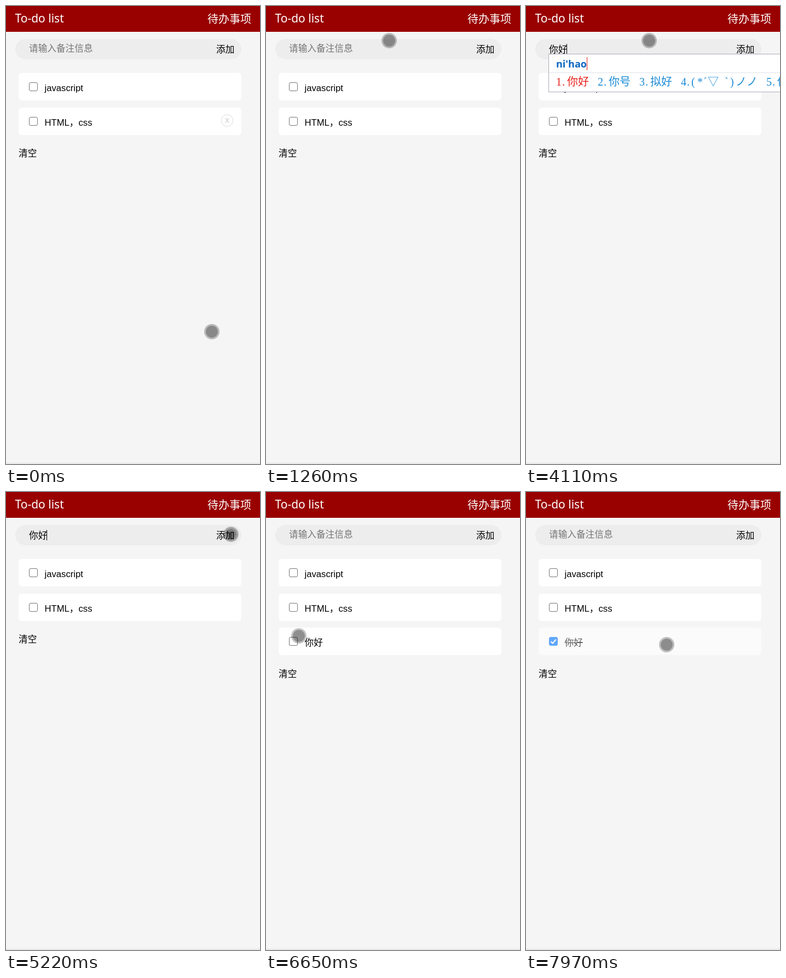
An HTML page for the animation above (8 s loop, 464 px wide and 834 px high).

```html
<!DOCTYPE html>
<html lang="zh-CN">
<head>
<meta charset="utf-8">
<style>
html, body { margin: 0; width: 100%; height: 100%; overflow: hidden; background: #f5f5f5; }
svg { display: block; width: 464px; height: 834px; }
text { font: 16.67px "Liberation Sans", "Noto Sans CJK SC", "Noto Sans CJK", sans-serif; white-space: pre; }
.head { font: 20px "Noto Sans CJK SC", "Noto Sans CJK", sans-serif; fill: #fff; }
.latin { font: 21px "Noto Sans", sans-serif; }
.pinyin { font: bold 18px "Open Sans", sans-serif; fill: #0a66c2; }
.cand { font: 300 20px "Liberation Serif", "Noto Sans CJK SC", "Noto Sans CJK", serif; }
</style>
</head>
<body>
<svg viewBox="0 0 464 834" xmlns="http://www.w3.org/2000/svg">
  <defs>
    <radialGradient id="press">
      <stop offset="0" stop-color="#000" stop-opacity=".56"/>
      <stop offset=".55" stop-color="#000" stop-opacity=".48"/>
      <stop offset="1" stop-color="#000" stop-opacity=".2"/>
    </radialGradient>
  </defs>
  <rect width="464" height="834" fill="#f5f5f5"/>
  <rect y="832" width="464" height="1" fill="#dcdcdc"/>
  <rect width="464" height="47" fill="#900"/>
  <text class="head latin" x="16.5" y="30">To-do list</text>
  <text class="head" x="368" y="30.5">待办事项</text>
  <rect x="17" y="60" width="413" height="37" rx="18.5" fill="#ededed"/>
  <text id="hint" x="42" y="83.3" fill="#757575">请输入备注信息</text>
  <text id="value" x="42" y="85.3"></text>
  <rect id="under" x="42" y="87" height="1"/>
  <rect id="caret" y="69" width="1" height="19"/>
  <text x="384" y="85.3">添加</text>
  <g id="rows"></g>
  <g id="remove">
    <circle cx="404" cy="208.5" r="10.7" fill="none" stroke="#dcdcdc"/>
    <text x="404" y="212.8" text-anchor="middle" fill="#d6d6d6" style="font-size:12px;font-weight:bold">X</text>
  </g>
  <text id="clear" x="23" y="274.3">清空</text>
  <g id="ime">
    <rect id="panel" x="41.5" y="87.5" height="69" fill="#fff" stroke="#a9adb8"/>
    <path id="split" stroke="#dfe3ea"/>
    <text id="pinyin" class="pinyin" x="55" y="112"></text>
    <rect id="bar" y="93" width="1" height="24" fill="#e02020"/>
    <g id="cands"></g>
  </g>
  <g id="pointer">
    <circle r="11" fill-opacity=".44"/>
    <circle r="12.5" fill="none" stroke="#000" stroke-width="3" stroke-opacity=".24"/>
  </g>
  <circle id="tap" r="14" fill="url(#press)"/>
</svg>
<script>
const LOOP = 8000;
const $ = id => document.getElementById(id);
const show = (id, on) => $(id).setAttribute('visibility', on ? 'inherit' : 'hidden');
const set = (id, name, v) => $(id).setAttribute(name, v);
const within = (t, spans) => spans.some(([a, b]) => t >= a && t < b);

// start, end, steps, x, y, upward bow
const moves = [
  [100, 730, 8, 225, 84, 0],
  [940, 1260, 4, 225, 63, 0],
  [4660, 5220, 6, 411, 77, 8],
  [5440, 5440, 1, 363, 82, 0],
  [5550, 6310, 8, 73, 225, 0],
  [6430, 6650, 3, 60, 262, 0],
  [6760, 6870, 2, 57, 271, 0],
  [7210, 7210, 1, 57, 273, 0],
  [7420, 7970, 6, 257, 278, 0]
];
const taps = [[640, 730], [1820, 1930], [5220, 5340], [7080, 7210]];
const carets = [[730, 1260], [1820, 2240], [2790, 4660], [5200, 5340]];
const typed = [[3240, 'n'], [3340, 'ni'], [3670, "ni'h"], [3790, "ni'hao"], [4110, '你好'], [5340, '']];
const ADD = 5340, CHECK = 7210;

function row(label, i) {
  const y = 122 + i * 62.6;
  const top = Math.round(y), box = Math.round(y + 17);
  return `<g id="row${i}">
    <rect x="23" y="${top}" width="407" height="50" rx="6" fill="#fff"/>
    <rect id="box${i}" x="42.5" y="${box + .5}" width="15" height="15" rx="2.5" fill="#fff" stroke="#767676"/>
    <text x="70.5" y="${top + 33}">${label}</text>
  </g>`;
}
$('rows').innerHTML = ['javascript', 'HTML，css', '你好'].map(row).join('');
$('row2').insertAdjacentHTML('beforeend', `<g id="done">
  <path d="M45.5 272.2l3.2 3.3 6-7" fill="none" stroke="#fff" stroke-width="2"/>
  <path d="M70.5 274.5h33.4" stroke="#000"/></g>`);

function candidates(words, gap) {
  return words.map((w, i) => {
    const x = 55 + i * gap;
    const at = w[0] === '(' ? [302, 313, 324, 332, 363, 373, 383, 403] : [...w].map((_, k) => x + 20 + k * 20);
    return `<text class="cand" y="145" x="${[x, x + 11, ...at].join(' ')}" fill="${i ? '#1a8ad6' : '#e8201a'}">${i + 1}.${w}</text>`;
  }).join('');
}
const shortList = candidates(['你', '呢', '年', '能', '那'], 56);
const longList = candidates(['你好', '你号', '拟好', '(*´▽`)ノノ'], 76) +
  '<text class="cand" y="145" x="439 450 459" fill="#1a8ad6">5.你</text>';
let list = '';

function pointerAt(t) {
  let x = 376, y = 593;
  for (const [a, b, n, tx, ty, bow] of moves) {
    if (t < a) break;
    const gap = (b - a) / (n - 1 || 1);
    const k = n > 1 ? Math.min(n, Math.floor((t - a) / gap + 1e-6) + 1) : 1;
    const p = k / n;
    x += (tx - x) * p;
    y += (ty - y) * p - bow * 4 * p * (1 - p);
  }
  return [x, y];
}

function draw(t) {
  const last = typed.filter(e => t >= e[0]).pop();
  const text = last ? last[1] : '';
  const composing = t >= 3240 && t < 4110;
  $('value').textContent = text;
  const width = text ? $('value').getComputedTextLength() : 0;
  show('hint', !text);
  show('under', composing);
  set('under', 'width', width);
  show('caret', within(t, carets));
  set('caret', 'x', Math.floor(42 + width - (width ? 1 : 0)));

  const wide = t >= 3670;
  show('ime', t >= 3240 && t < 4260);
  set('panel', 'width', wide ? 430 : 363);
  set('split', 'd', `M42 121.5H${wide ? 464 : 404}`);
  $('pinyin').textContent = composing ? text : "ni'hao";
  set('bar', 'x', Math.round(55 + $('pinyin').getComputedTextLength()));
  const next = wide ? longList : shortList;
  if (next !== list) $('cands').innerHTML = list = next;

  const checked = t >= CHECK;
  show('remove', t < 730);
  show('row2', t >= ADD);
  show('done', checked);
  set('row2', 'opacity', checked ? .6 : 1);
  set('box2', 'fill', checked ? '#0075ff' : '#fff');
  set('box2', 'stroke', checked ? '#0075ff' : '#767676');
  set('clear', 'y', t >= ADD ? 337.3 : 274.3);

  const place = `translate(${pointerAt(t)})`;
  const down = within(t, taps);
  set('pointer', 'transform', place);
  set('tap', 'transform', place);
  show('pointer', !down);
  show('tap', down);
}

const start = performance.now();
function tick() {
  draw((performance.now() - start) % LOOP);
  requestAnimationFrame(tick);
}
tick();
</script>
</body>
</html>
```
